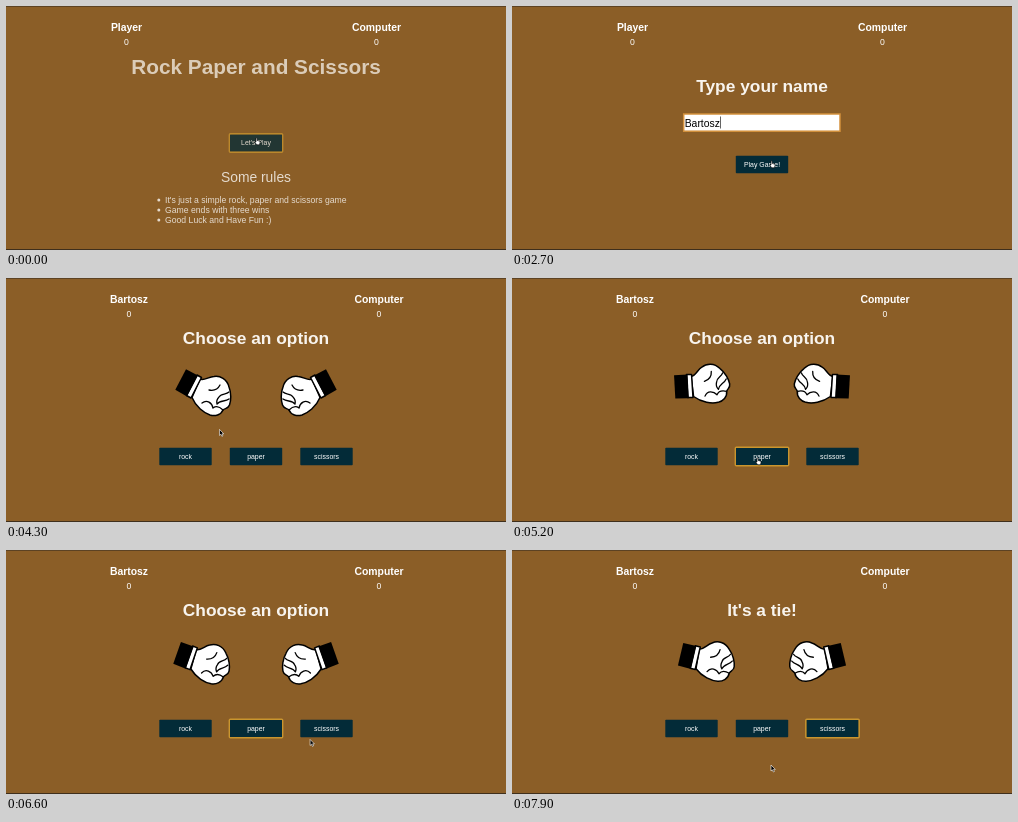
An HTML page that plays this animation: 500x244 px, repeating every 8000 ms.

```html
<!DOCTYPE html>
<html lang="en">
<head>
<meta charset="utf-8">
<title>Rock Paper and Scissors</title>
<style>
  html, body { margin: 0; width: 100%; height: 100%; overflow: hidden; background: #8b5e27; }
  svg { display: block; width: 100vw; height: 100vh; }
  text { font-family: "Liberation Sans", Arial, sans-serif; font-size: 8.67px; fill: #fff; text-anchor: middle; }
  .name { font-size: 10.4px; font-weight: bold; }
  .title { font-size: 20.8px; font-weight: bold; fill: #f3ede4; }
  .head { font-size: 17.33px; font-weight: bold; fill: #f8f4ee; }
  .rules { font-size: 13.87px; }
  .item { text-anchor: start; }
  .typed { font-size: 10.4px; fill: #000; text-anchor: start; }
  .btn text { font-size: 6.93px; }
  .btn rect { fill: #032b38; }
  .btn .ring { fill: none; stroke: #c9952f; stroke-width: 1.4; }
  .skin { fill: #fff; stroke: #000; stroke-width: 1.5; stroke-linejoin: round; }
  .crease { fill: none; stroke: #000; stroke-width: 1.3; stroke-linecap: round; }
</style>
</head>
<body>
<svg viewBox="0 0 500 244" preserveAspectRatio="none">
  <defs>
    <g id="sleeve">
      <path d="M191 97 L195.500 99.500 L185 120 L180.500 117.500Z" class="skin"/>
      <path d="M180 91.300 L192 97.600 L181 118.500 L169.300 111.800Z"/>
    </g>
    <g id="rock">
      <path class="skin" d="M194 101 C198 103 203 98.500 208 98.500 C214 97.500 221 101 223 109 C225.500 115 225 123 223.500 127 C222 131 219 130 217 132 C215 137 209 138.500 204 137 C198 135 190 129 186 119.500Z"/>
      <path class="crease" d="M203 112 C208 113 212 111 214 107 M213 119 C215 115 220 117 223 114 M211 126 C214 122 219 124 223 121 M207 130 C211 127 214 129 217 132 M196 125 C201 121 206 125 207 130 M213 119 Q210 122 211 126"/>
      <use href="#sleeve"/>
    </g>
    <g id="paper">
      <path class="skin" d="M194 101 C200 105 205 101 212 106 C219 108 225 111 229 118 L239.500 135 C242 141 238 144 235 140.500 C236 144 230 145 227 140.500 C226 144 220 143 218 137.500 C216 140 212 138 209 134 C203 132 192 127 186 119.500Z"/>
      <path class="crease" d="M235 140.500 L225 127 M227 140.500 L217 128 M218 137.500 L210 128 M202 113 C206 119 212 118 216 115 C220 116 223 119 226 122"/>
      <use href="#sleeve"/>
    </g>
    <g id="hand"><use class="shape" href="#rock"/></g>
  </defs>

  <rect width="500" height="244" fill="#8b5e27"/>
  <rect width="500" height="1" fill="#5c4223"/>
  <rect y="243" width="500" height="1" fill="#3f2f1c"/>

  <g id="player"><text class="name" y="25"></text><text y="39.300">0</text></g>
  <g id="computer"><text class="name" y="25">Computer</text><text y="39.300">0</text></g>

  <g id="intro">
    <text class="title" x="250" y="68">Rock Paper and Scissors</text>
    <g class="btn" data-x="250" data-y="137" data-label="Let's Play"></g>
    <text class="rules" x="250" y="175.500">Some rules</text>
    <g fill="#fff"><circle cx="152.800" cy="194" r="1.500"/><circle cx="152.800" cy="204" r="1.500"/><circle cx="152.800" cy="214" r="1.500"/></g>
    <text class="item" x="159" y="197">It's just a simple rock, paper and scissors game</text>
    <text class="item" x="159" y="207">Game ends with three wins</text>
    <text class="item" x="159" y="217">Good Luck and Have Fun :)</text>
  </g>

  <g id="form">
    <text class="head" x="250" y="86.300">Type your name</text>
    <rect x="171.700" y="108" width="156.300" height="17.200" fill="#fff" stroke="#d4913c" stroke-width="1.500"/>
    <text class="typed" x="172.700" y="120.700"></text>
    <rect id="caret" y="110.500" width=".7" height="12" fill="#222"/>
    <g class="btn" data-x="250" data-y="158.500" data-label="Play Game!"></g>
  </g>

  <g id="match">
    <text class="head" id="result" x="250" y="66.200"></text>
    <g class="arm"><use href="#hand"/></g>
    <g transform="translate(500) scale(-1 1)"><g class="arm"><use href="#hand"/></g></g>
    <g class="btn" data-x="179.500" data-y="178.500" data-label="rock"></g>
    <g class="btn" data-x="250" data-y="178.500" data-label="paper"></g>
    <g class="btn" data-x="320.500" data-y="178.500" data-label="scissors"></g>
  </g>

  <g id="cursor" stroke-width=".6" stroke-linejoin="round">
    <path data-kind="arrow" d="M0 0 V6 L1.400 4.800 L2.400 7 L3.400 6.500 L2.500 4.400 H4.300Z" fill="#000" stroke="#fff"/>
    <path data-kind="hand" d="M1 0 Q2 -.5 2.200 .6 V2.500 L5 3.200 V5 L4.300 6.800 H1.800 L-.4 4 L1 4Z" fill="#fff" stroke="#000"/>
    <path data-kind="beam" d="M-1 -3 H1 M0 -3 V3 M-1 3 H1" fill="none" stroke="#000"/>
  </g>
</svg>
<script>
const LOOP = 8000, FADE = 500, NAME = "Bartosz";
const NAMED = 3190, PLAY = [5070, 7357], SHAKE = 2000, SWING = -42;
const $ = id => document.getElementById(id);
const all = selector => [...document.querySelectorAll(selector)];

const rings = {};
for (const b of all(".btn")) {
  const { x, y, label } = b.dataset;
  b.setAttribute("transform", `translate(${x} ${y})`);
  b.innerHTML = `<rect x="-26.2" y="-8.700" width="52.4" height="17.400" rx=".8"/>
    <rect class="ring" x="-26.700" y="-9.200" width="53.400" height="18.400" rx="1"/><text y="2.400">${label}</text>`;
  rings[label] = b.querySelector(".ring");
}

const clamp = v => Math.min(1, Math.max(0, v));
const show = (el, on) => el.setAttribute("visibility", on ? "inherit" : "hidden");

// CSS "ease", cubic-bezier(.25, .1, .25, 1)
function ease(p) {
  p = clamp(p);
  let lo = 0, hi = 1, u = p;
  for (let i = 0; i < 24; i++) {
    u = (lo + hi) / 2;
    const x = 0.75 * u * (1 - u) + u ** 3;
    if (x < p) lo = u; else hi = u;
  }
  return 0.3 * u * (1 - u) ** 2 + 3 * u * u * (1 - u) + u ** 3;
}

const fade = (t, start) => ease((t - start) / FADE);

const stops = [0, .15, .25, .35, .5, .65, .75, .85, 1];
function swing(p) {
  if (p <= 0 || p >= 1) return 0;
  const i = stops.findIndex(s => s > p) - 1;
  const e = ease((p - stops[i]) / (stops[i + 1] - stops[i]));
  return SWING * (i % 2 ? 1 - e : e);
}

// time, x, y, pointer shape until the next entry
const path = [
  [0, 249, 132, "hand"], [400, 249, 132, "arrow"], [950, 249, 132, "arrow"],
  [1150, 276, 85, "arrow"], [1250, 276, 85, "arrow"], [1500, 230, 116, "beam"],
  [1700, 230, 116, ""], [2450, 230, 116, "arrow"], [2680, 258, 155, "hand"],
  [3190, 258, 155, "arrow"], [3550, 191, 143, "arrow"], [3750, 191, 143, "arrow"],
  [4400, 215, 152, "arrow"], [4550, 215, 152, "arrow"], [4900, 244, 180, "hand"],
  [5300, 244, 180, "arrow"], [6050, 284, 198, "arrow"], [6300, 284, 198, "arrow"],
  [6900, 324, 181, "hand"], [7400, 324, 181, "arrow"], [7850, 259, 215, "arrow"],
  [LOOP, 259, 215, "arrow"]
];

function moveCursor(t) {
  const i = path.findIndex(k => k[0] > t) - 1;
  const [t0, x0, y0, kind] = path[i], [t1, x1, y1] = path[i + 1];
  const p = (t - t0) / (t1 - t0), s = p * p * (3 - 2 * p);
  $("cursor").setAttribute("transform", `translate(${x0 + (x1 - x0) * s} ${y0 + (y1 - y0) * s})`);
  for (const c of $("cursor").children) show(c, c.dataset.kind === kind);
}

function draw(t) {
  const named = t >= NAMED, tied = t >= PLAY[0] + SHAKE;
  $("player").setAttribute("transform", `translate(${named ? 123 : 120.5})`);
  $("computer").setAttribute("transform", `translate(${named ? 373 : 370.5})`);
  $("player").firstChild.textContent = named ? NAME : "Player";

  $("intro").setAttribute("opacity", 1 - fade(t, -83));
  $("form").setAttribute("opacity", fade(t, 417) * (1 - fade(t, NAMED)));
  $("match").setAttribute("opacity", fade(t, NAMED + FADE));

  const typed = document.querySelector(".typed");
  typed.textContent = NAME.slice(0, clamp((Math.floor((t - 1700) / 100) + 1) / NAME.length) * NAME.length + .01);
  $("caret").setAttribute("x", 173 + (typed.textContent ? typed.getComputedTextLength() : 0));
  show($("caret"), t >= 1400 && !named);

  const start = t >= PLAY[1] ? PLAY[1] : PLAY[0];
  const angle = swing((t - start) / SHAKE);
  for (const arm of all(".arm")) arm.setAttribute("transform", `rotate(${angle} 182 127)`);
  document.querySelector(".shape").setAttribute("href", tied && t < PLAY[1] ? "#paper" : "#rock");
  $("result").textContent = tied ? "It's a tie!" : "Choose an option";

  show(rings["Let's Play"], true);
  show(rings["Play Game!"], false);
  show(rings.rock, false);
  show(rings.paper, t >= 4980 && t < 7180);
  show(rings.scissors, t >= 7180);
  moveCursor(t);
}

const origin = performance.now();
function tick() {
  draw((performance.now() - origin) % LOOP);
  requestAnimationFrame(tick);
}
tick();
</script>
</body>
</html>
```
